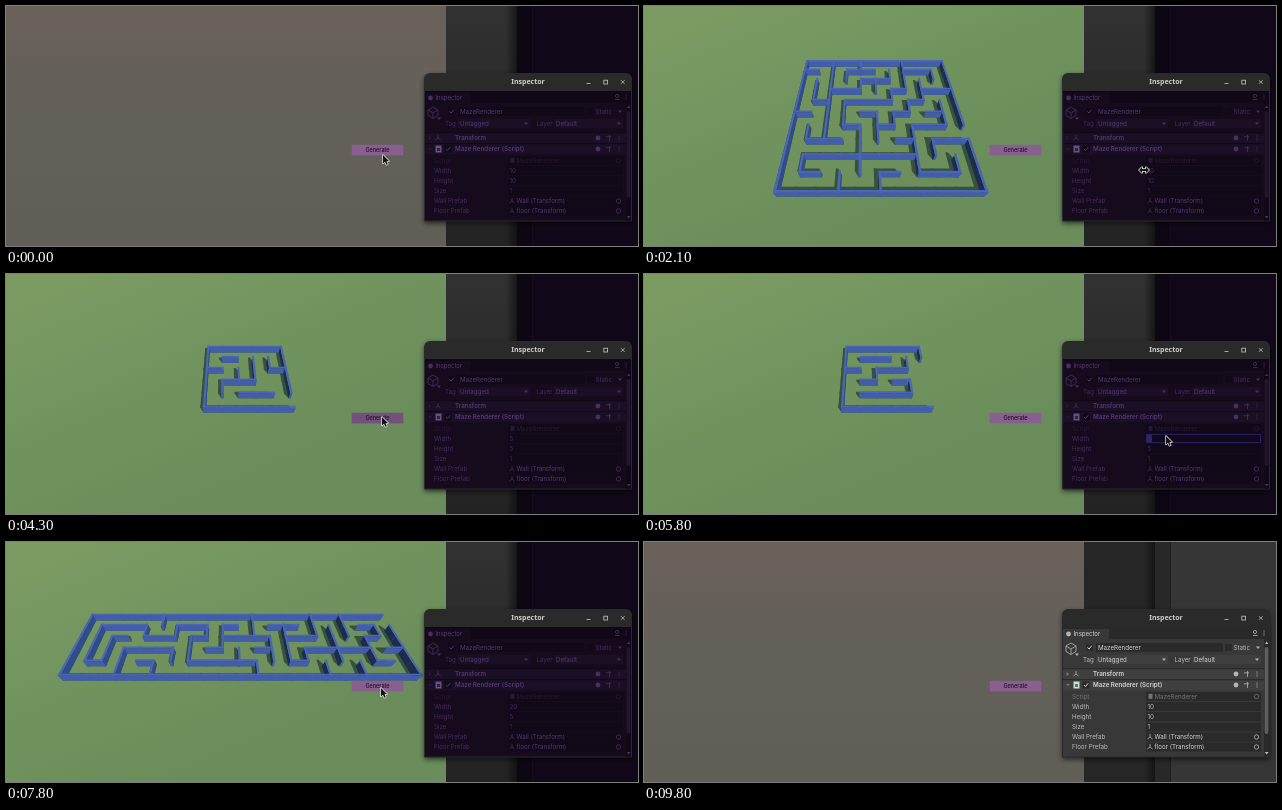
Recreate the animation shown at these times as an HTML page with a canvas. Size 632 by 240 pixels, loop 9.9 s.

```html
<!DOCTYPE html>
<html lang="en">
<head>
<meta charset="utf-8">
<title>Maze generator</title>
<style>
html, body { margin: 0; width: 100%; height: 100%; overflow: hidden; background: #222; }
canvas { display: block; }
</style>
</head>
<body>
<canvas id="stage" width="632" height="240"></canvas>
<script>
const ctx = document.getElementById('stage').getContext('2d');
const LOOP = 9900, STEP = 100, PLAY_END = 9400;
const UI = 'Inter, sans-serif';

// ---------- drawing helpers ----------
function rect(x, y, w, h, fill) {
  ctx.fillStyle = fill;
  ctx.fillRect(x, y, w, h);
}
function poly(points, fill) {
  ctx.beginPath();
  points.forEach(p => ctx.lineTo(...p));
  ctx.closePath();
  ctx.fillStyle = fill;
  ctx.fill();
}
function line(points, color, width = 0.8) {
  ctx.beginPath();
  points.forEach(p => ctx.lineTo(...p));
  ctx.strokeStyle = color;
  ctx.lineWidth = width;
  ctx.stroke();
}
function label(text, x, y, color, size = 6.2, weight = 400, align = 'left', family = UI) {
  ctx.font = `${weight} ${size}px ${family}`;
  ctx.textAlign = align;
  ctx.textBaseline = 'middle';
  ctx.fillStyle = color;
  ctx.fillText(text, x, y + 0.3);
}
function gradient(x0, y0, x1, y1, ...colors) {
  const g = ctx.createLinearGradient(x0, y0, x1, y1);
  colors.forEach((c, i) => g.addColorStop(i / (colors.length - 1), c));
  return g;
}

// ---------- maze ----------
function random(seed) {
  let s = seed * 7919 + 17;
  return () => (s = (s * 48271) % 2147483647) / 2147483647;
}

// across[row][col]: walls along x; down[row][col]: walls along depth
function grid(w, h, filled) {
  const make = (rows, cols) => Array.from({ length: rows }, () => Array(cols).fill(filled));
  return { w, h, across: make(h + 1, w), down: make(h, w + 1) };
}

function carve(w, h, seed) {
  const maze = grid(w, h, true), rnd = random(seed), seen = new Set();
  for (let i = 0; i < 5; i++) rnd();
  const stack = [[Math.floor(rnd() * w), Math.floor(rnd() * h)]];
  seen.add(stack[0].join());
  while (stack.length) {
    const [x, y] = stack[stack.length - 1];
    const open = [[1, 0], [-1, 0], [0, 1], [0, -1]].filter(([dx, dy]) => {
      const nx = x + dx, ny = y + dy;
      return nx >= 0 && ny >= 0 && nx < w && ny < h && !seen.has([nx, ny].join());
    });
    if (!open.length) { stack.pop(); continue; }
    const [dx, dy] = open[Math.floor(rnd() * open.length)];
    if (dx) maze.down[y][x + (dx > 0 ? 1 : 0)] = false;
    else maze.across[y + (dy > 0 ? 1 : 0)][x] = false;
    seen.add([x + dx, y + dy].join());
    stack.push([x + dx, y + dy]);
  }
  maze.down[Math.floor(rnd() * h)][w] = false;
  return maze;
}

// Small mazes given as runs: [line, from, to]
function fromRuns(across, down) {
  const maze = grid(5, 5, false);
  [[0, 0, 5], [5, 0, 5], ...across].forEach(([r, a, b]) => maze.across[r].fill(true, a, b));
  [[0, 0, 5], ...down].forEach(([c, a, b]) => {
    for (let r = a; r < b; r++) maze.down[r][c] = true;
  });
  return maze;
}

const mazes = [
  [100, carve(10, 10, 3)],
  [600, carve(10, 10, 8)],
  [900, carve(10, 10, 5)],
  [1200, carve(10, 10, 11)],
  [1500, carve(10, 10, 14)],
  [3700, carve(5, 5, 6)],
  [4300, fromRuns(
    [[1, 1, 2], [2, 0, 1], [2, 4, 5], [3, 1, 3], [4, 2, 4]],
    [[3, 1, 3], [4, 1, 2], [1, 3, 4], [2, 2, 3], [5, 0, 4]])],
  [4600, carve(5, 5, 9)],
  [4900, carve(5, 5, 4)],
  [5200, fromRuns(
    [[1, 1, 3], [2, 0, 1], [2, 2, 4], [3, 1, 2], [3, 3, 4], [4, 1, 4]],
    [[2, 2, 3], [4, 1, 2], [4, 3, 4], [5, 0, 1]])],
  [6800, carve(20, 5, 7)],
  [7300, carve(20, 5, 12)],
  [7600, carve(20, 5, 16)],
  [8000, carve(20, 5, 21)],
  [8400, carve(20, 5, 26)]
];

// Perspective: x to the right, z towards the viewer, drop below the wall tops
function project(x, z, drop = 0) {
  const scale = 220.3 / (16.37 - 0.6 * z + 0.8 * drop);
  return [219.8 + scale * x, -171.5 + scale * (10.08 + drop) / 0.6];
}

const WALL = 0.5, HALF = 0.065;

function drawShadow({ x0, x1, z0, z1 }) {
  const sx = -0.42 * WALL, sz = -0.73 * WALL;
  poly([[x1, z1], [x0, z1], [x0 + sx, z1 + sz], [x0 + sx, z0 + sz], [x1 + sx, z0 + sz], [x1, z0]]
    .map(([x, z]) => project(x, z, WALL)), '#36523f');
}

function drawFaces({ x0, x1, z0, z1, left, right, front }) {
  const back = Math.min(z0 + 2 * HALF, z1);
  const side = (x, color) =>
    poly([project(x, back), project(x, z1), project(x, z1, WALL), project(x, back, WALL)], color);
  if (left && x0 > 0) side(x0, '#1c2c4d');
  if (right && x1 < 0) side(x1, '#314c8c');
  if (front) {
    poly([project(x0, z1), project(x1, z1), project(x1, z1, WALL), project(x0, z1, WALL)], '#425eab');
  }
}

function drawTop({ x0, x1, z0, z1 }) {
  poly([project(x0, z0), project(x1, z0), project(x1, z1), project(x0, z1)], '#4a66b5');
}

function drawMaze({ w, h, across, down }) {
  const originX = 0.8 - Math.floor(w / 2), originZ = 5 - h + Math.floor(h / 2);
  const walls = [];
  const add = (x, z, dx, dz, left, right, front) => walls.push({
    x0: originX + x - HALF, x1: originX + x + dx + HALF,
    z0: originZ + z - HALF, z1: originZ + z + dz + HALF,
    left, right, front
  });
  // far to near; faces inside a run stay hidden
  for (let r = 0; r <= h; r++) {
    across[r].forEach((on, c) => on && add(c, r, 1, 0, !across[r][c - 1], !across[r][c + 1], true));
    if (r < h) down[r].forEach((on, c) => on && add(c, r, 0, 1, true, true, !down[r + 1]?.[c]));
  }
  walls.forEach(drawShadow);
  walls.forEach(drawFaces);
  walls.forEach(drawTop);
}

// ---------- editor ----------
const themes = {
  play: {
    page: '#100818', body: '#150b1d', bar: '#1b0f25', tabs: '#100817', field: '#110918', edge: '#0b0510',
    text: '#452a5c', strong: '#543775', dim: '#291735', icon: '#4a2f5e'
  },
  edit: {
    page: '#363636', body: '#383838', bar: '#3f3f3f', tabs: '#292929', field: '#2a2a2a', edge: '#202020',
    text: '#bdbdbd', strong: '#d6d6d6', dim: '#747474', icon: '#b4b4b4'
  }
};

function drawBackground(play, green) {
  rect(0, 0, 440, 240, green
    ? gradient(60, 0, 160, 240, '#7b9b62', '#71945f', '#6a8d5b')
    : gradient(0, 0, 0, 240, '#6a615a', '#64605a', '#605e56'));
  rect(440, 0, 72, 240, play ? gradient(0, 0, 0, 240, '#303130', '#222322') : '#262626');
  rect(500, 0, 12, 240, gradient(500, 0, 512, 0, 'rgba(12,12,12,0)', 'rgba(12,12,12,.75)'));
  rect(511, 0, 121, 240, themes[play ? 'play' : 'edit'].page);
  rect(511, 0, 16, 240, play ? 'rgba(8,4,14,.4)' : '#282828');
  rect(526, 0, 1, 240, play ? '#160c20' : '#1f1f1f');
}

function field(y, text, c, focus) {
  rect(502, y - 4.5, 115, 9, c.field);
  if (focus) {
    ctx.strokeStyle = '#241d62';
    ctx.lineWidth = 1;
    ctx.strokeRect(502.5, y - 4, 114, 8);
    rect(503, y - 3.5, 5, 7, '#2a2468');
  }
  label(text, 503.5, y, c.text);
}

function caret(x, y, color) {
  poly([[x - 2, y - 1], [x + 2, y - 1], [x, y + 1.6]], color);
}
function disc(x, y, r, color) {
  ctx.beginPath();
  ctx.arc(x, y, r, 0, Math.PI * 2);
  ctx.fillStyle = color;
  ctx.fill();
}
function ring(x, y, r, color) {
  ctx.beginPath();
  ctx.arc(x, y, r, 0, Math.PI * 2);
  ctx.strokeStyle = color;
  ctx.lineWidth = 0.8;
  ctx.stroke();
}
function tick(x, y, c) {
  rect(x - 3.5, y - 3.5, 7, 7, c.field);
  line([[x - 2, y], [x - 0.5, y + 1.6], [x + 2.2, y - 1.8]], c.strong, 1);
}
function dots(x, y, color) {
  [-2, 0, 2].forEach(d => rect(x - 0.5, y + d - 0.5, 1, 1, color));
}
function axes(x, y, color) {
  [[0, -3], [-2.6, 2], [2.6, 2]].forEach(([dx, dy]) => line([[x, y], [x + dx, y + dy]], color));
}

function componentBar(y, title, c) {
  rect(419, y - 5.3, 201, 10.6, c.bar);
  rect(419, y - 5.6, 201, 0.8, c.edge);
  label(title, 449, y, c.strong, 6.2, 600);
  disc(592, y, 2.4, c.icon);
  line([[600, y - 1.2], [605, y - 1.2]], c.icon);
  line([[603.5, y - 3], [603.5, y + 3]], c.icon);
  dots(613, y, c.icon);
}

function drawWindow() {
  ctx.save();
  ctx.shadowColor = 'rgba(0,0,0,.6)';
  ctx.shadowBlur = 5;
  ctx.shadowOffsetY = 2;
  ctx.beginPath();
  ctx.roundRect(418, 67, 208, 148.5, [6, 6, 1, 1]);
  ctx.fillStyle = '#2b2a2a';
  ctx.fill();
  ctx.restore();
  label('Inspector', 522, 76, '#d0cecc', 7, 700, 'center', '"Noto Sans", sans-serif');
  line([[580.5, 77.5], [584.5, 77.5]], '#c4c4c4');
  ctx.strokeRect(597.8, 74.2, 3.8, 3.8);
  line([[615, 74.2], [618.6, 77.8]], '#c4c4c4');
  line([[618.6, 74.2], [615, 77.8]], '#c4c4c4');
}

function drawInspector(play, t, width, height) {
  const c = themes[play ? 'play' : 'edit'];
  drawWindow();
  rect(419, 85, 206, 129.5, c.body);
  rect(419, 85, 206, 12, c.tabs);
  rect(419, 87, 46, 10, c.body);
  disc(424.5, 92, 2.4, c.icon);
  label('Inspector', 429.5, 92, c.strong, 6);
  ring(611, 90, 1.6, c.icon);
  line([[609, 93.5], [613.5, 93.5]], c.icon);
  dots(620, 91, c.icon);

  // object header
  line([[427, 101], [432, 104], [432, 109.5], [427, 112.5], [422, 109.5], [422, 104], [427, 101]], c.icon);
  line([[422, 104], [427, 107], [432, 104]], c.icon);
  line([[427, 107], [427, 112.5]], c.icon);
  caret(433, 112.5, c.icon);
  tick(445.5, 105.5, c);
  rect(452, 101, 127, 9, c.field);
  label('MazeRenderer', 454, 105.5, c.strong);
  rect(581, 102, 7, 7, c.field);
  label('Static', 589.5, 105.5, c.text);
  caret(614, 105.5, c.icon);
  label('Tag', 439, 117.5, c.text);
  rect(452, 113, 72, 9, c.bar);
  label('Untagged', 454, 117.5, c.strong);
  caret(520, 117.5, c.icon);
  label('Layer', 530.5, 117.5, c.text);
  rect(548, 113, 69, 9, c.bar);
  label('Default', 550, 117.5, c.strong);
  caret(613, 117.5, c.icon);

  // components
  componentBar(132, 'Transform', c);
  componentBar(143, 'Maze Renderer (Script)', c);
  poly([[422.5, 130], [425.5, 132], [422.5, 134]], c.dim);
  axes(432, 132, c.icon);
  caret(424, 143, c.dim);
  rect(429.5, 139.5, 6, 7, play ? '#67507c' : '#d5d9d5');
  rect(431, 142, 3, 3, play ? '#30204a' : '#3d8a5a');
  tick(442, 143, c);

  // fields
  label('Script', 428, 154.5, c.dim);
  field(154.5, '', c);
  rect(504.5, 151.8, 4, 5, c.dim);
  label('MazeRenderer', 510.5, 154.5, c.dim);
  ring(612.5, 154.5, 2.2, c.dim);
  label('Width', 428, 164.5, c.text);
  field(164.5, width, c, (t >= 2600 && t < 3000) || (t >= 5800 && t < 6800));
  label('Height', 428, 174.7, c.text);
  field(174.7, height, c, t >= 3000 && t < 3700);
  label('Size', 428, 185, c.text);
  field(185, '1', c);
  [['Wall', 195], ['Floor', 205]].forEach(([name, y]) => {
    label(name + ' Prefab', 428, y, c.text);
    field(y, '', c);
    axes(506, y, c.icon);
    label((name === 'Floor' ? 'floor' : name) + ' (Transform)', 510.5, y, c.strong);
    ring(612.5, y, 2.2, c.icon);
  });

  // scrollbar
  rect(620, 97, 5, 117.5, c.tabs);
  ctx.beginPath();
  ctx.roundRect(620.6, 105, 3.8, 87, 2);
  ctx.fillStyle = play ? '#26142f' : '#5e5e5e';
  ctx.fill();
  poly([[621, 102], [624.4, 102], [622.7, 99.5]], c.icon);
  caret(622.7, 211, c.icon);
}

// ---------- pointer ----------
const pointerKeys = [
  [0, 377, 149], [600, 378, 143], [1500, 378, 142], [2000, 500, 164], [2400, 500, 164],
  [2600, 528, 164], [2800, 528, 164], [3000, 528, 173], [3200, 528, 173], [3700, 376, 143],
  [5200, 376, 143], [5700, 522, 162], [6100, 522, 162], [6700, 376, 146], [7200, 375, 146],
  [8700, 375, 146], [9400, 330, -20]
];

function pointerAt(t) {
  const i = pointerKeys.findIndex(k => k[0] > t);
  if (i < 0) return null;
  const [t0, x0, y0] = pointerKeys[i - 1], [t1, x1, y1] = pointerKeys[i];
  const p = (t - t0) / (t1 - t0), e = p * p * (3 - 2 * p);
  return [x0 + (x1 - x0) * e, y0 + (y1 - y0) * e];
}

function drawPointer(t) {
  const at = pointerAt(t);
  if (!at) return;
  ctx.save();
  ctx.translate(...at);
  ctx.lineJoin = 'round';
  const shape = t >= 2000 && t < 2600
    ? [[-5, 0], [-2, -3], [-2, -1], [2, -1], [2, -3], [5, 0], [2, 3], [2, 1], [-2, 1], [-2, 3]]
    : [[0, 0], [0, 8.6], [2, 6.8], [3.4, 9.8], [4.8, 9.2], [3.5, 6.2], [6, 6]];
  line([...shape, shape[0], shape[1]], '#e8e8e8', 1.4);
  poly(shape, '#141414');
  ctx.restore();
}

function drawButton(t) {
  const pressed = mazes.some(([start]) => t === start);
  rect(345.7, 138.8, 51.6, 10.6, pressed ? '#74507c' : '#895f90');
  label('Generate', 371.5, 144, '#1f1128', 5.5, 500, 'center');
}

// ---------- timeline ----------
function valueAt(t, changes) {
  return changes.filter(([start]) => t >= start).pop()[1];
}

function draw(t) {
  const playing = t < PLAY_END;
  const current = playing && mazes.filter(([start]) => t >= start).pop();
  drawBackground(playing, !!current);
  if (current) drawMaze(current[1]);
  drawButton(t);
  drawInspector(playing, t,
    valueAt(t, [[0, '10'], [2700, '5'], [6000, '2'], [6100, '20'], [PLAY_END, '10']]),
    valueAt(t, [[0, '10'], [3200, '5'], [PLAY_END, '10']]));
  drawPointer(t);
}

function animate() {
  const t = performance.now() % LOOP;
  draw(Math.floor(t / STEP) * STEP);
  requestAnimationFrame(animate);
}
animate();
</script>
</body>
</html>
```
